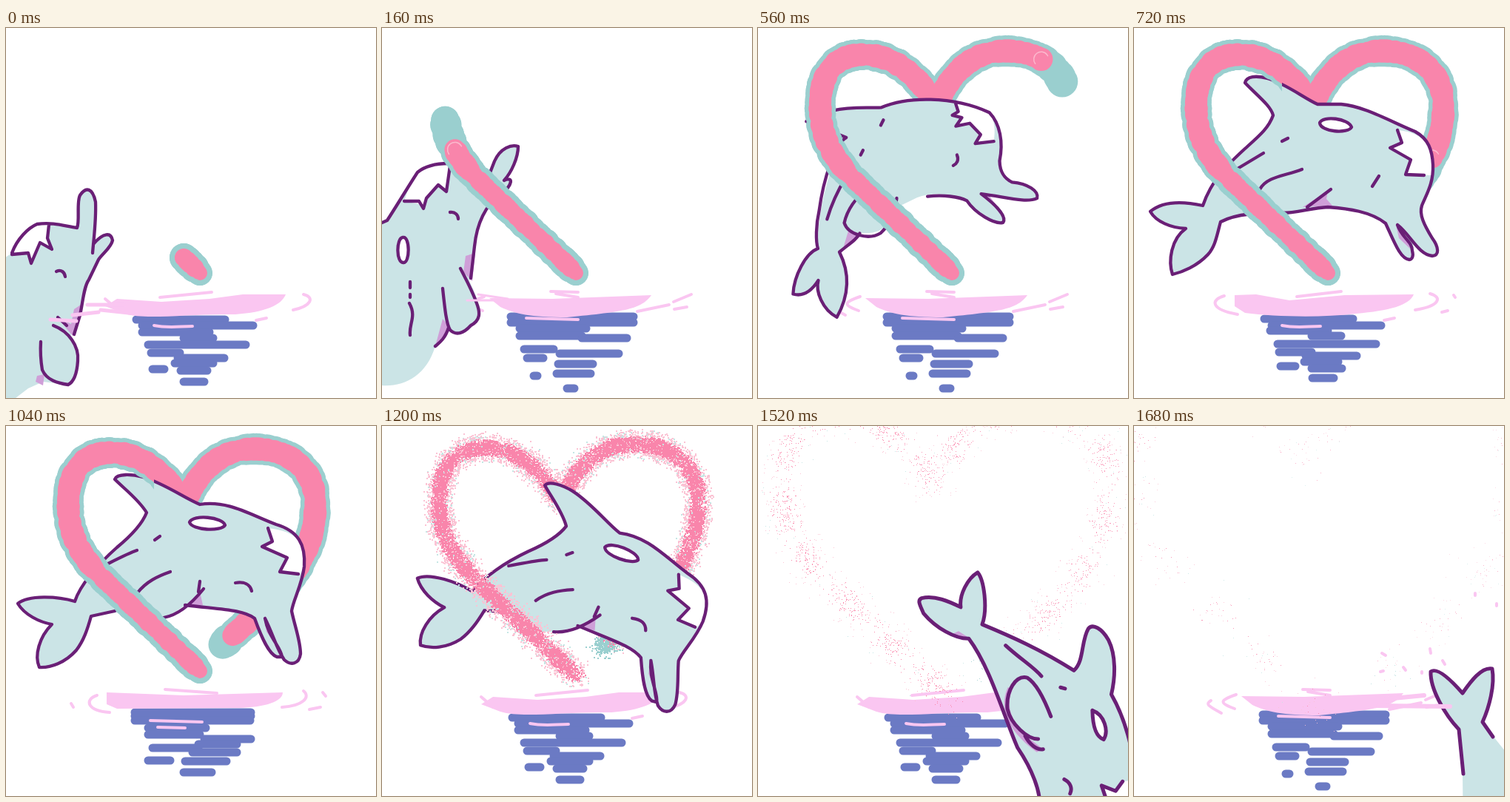
Animation of 500 by 500 pixels, one loop 1760 ms. Source, as an HTML page with a canvas:

```html
<!DOCTYPE html>
<html>
<head>
<meta charset="utf-8">
<style>
html, body { margin: 0; width: 100%; height: 100%; overflow: hidden; background: #fff; }
canvas { display: block; }
svg { position: absolute; width: 0; height: 0; }
</style>
</head>
<body>
<canvas id="stage" width="500" height="500"></canvas>
<svg><path id="heart" d="M262 331L130 205C95 170 84 140 84 105C84 60 105 37 140 36C185 35 217 66 241 105C260 60 290 31 335 31C385 31 418 60 418 105C418 160 395 195 360 235L292 296"/></svg>
<script>
const ctx = document.getElementById('stage').getContext('2d');
const heart = document.getElementById('heart');
const STEP = 80, STEPS = 22;
const BODY = '#cbe4e6', INK = '#6a1f76', PATCH = '#cf9fd8', PINK = '#f985ab',
  PALE = '#fbc3d4', TEAL = '#9acfcf', FOAM = '#fac6f1', SEA = '#6b7ac4';

const total = heart.getTotalLength();
const trail = [];
for (let l = 0; l <= total; l += 2) trail.push(heart.getPointAtLength(l));

// Each pose: step, anchor x/y, heading, then its shapes.
const poses = [
  { s: 0, x: 30, y: 420, a: -115,
    fill: 'M8 304C15 285 30 270 42 265C65 262 80 268 96 270C100 262 95 235 100 226C108 214 117 216 121 235L120 290C132 278 142 276 144 287C142 297 130 305 125 313L112 340C105 350 104 370 100 388L88 415C99 440 97 470 84 482L50 478L30 487L0 510L-80 640L-160 500L-60 350Z',
    white: 'M8 304C15 285 30 270 42 266L58 266L56 284L62 299L46 290L34 318L30 304Z',
    patch: 'M101 374L92 380L88 400L70 392L90 416L99 396ZM42 470L52 468L50 483L40 478Z',
    line: 'M8 304C15 285 30 270 42 265C65 262 80 268 96 270C100 262 95 235 100 226C108 214 117 216 121 235C122 260 119 280 117 304M118 292C132 276 142 276 144 287C142 297 130 305 125 313L112 340C105 350 104 370 100 388L92 414M58 266L56 284L62 299L46 290L34 318L30 304L8 306M68 329C75 326 79 330 80 336M64 402C85 410 99 430 97 450C96 465 92 478 84 482C70 480 55 476 49 462C47 450 46 440 47 424M70 391L82 402' },
  { s: 2, x: 45, y: 320, a: -90,
    fill: 'M5 262C20 240 35 215 48 195C60 185 78 183 90 183C110 190 130 200 145 198L150 180C160 162 175 157 184 160C184 175 175 195 168 204C178 202 176 212 160 226C140 238 128 265 125 295L118 342C135 375 133 390 120 402C110 413 100 416 92 408L72 430C60 470 30 485 0 483L-80 480L-60 290Z',
    white: 'M30 234C36 215 42 203 50 194C60 185 78 183 92 184L87 220L76 212L60 230L56 245L50 238ZM28 283C38 280 38 318 29 317C19 318 19 284 28 283Z',
    patch: 'M113 308L126 304L122 342L110 330ZM82 393L92 405L72 430Z',
    line: 'M0 263L7 260C20 240 35 215 48 195C60 185 78 183 90 183M145 198L152 180C160 162 175 157 184 160C184 175 175 195 165 206C178 200 177 212 160 226C140 238 128 265 125 295L120 338M30 234L50 234L56 244L60 230L76 212L87 221L92 186M92 249C99 248 103 253 103 258M28 283C38 280 38 318 29 317C19 318 19 284 28 283M38 343v8M38 360v4M37 372C47 390 36 400 38 415M82 352C85 380 87 400 92 408C100 416 110 413 120 402C133 395 133 385 128 372C122 355 118 348 106 325M90 405C85 420 78 425 72 430' },
  { s: 5, x: 106, y: 200, a: -68,
    fill: 'M-20 180L5 172C25 155 45 148 62 138C85 110 140 80 195 78C215 85 230 105 237 130C245 145 255 148 265 148C285 140 303 142 305 152C295 165 265 170 235 181C258 185 280 192 279 202C270 210 240 208 222 198C200 198 172 210 160 225L141 250C145 270 142 292 113 302L100 338C130 360 138 390 137 418C115 418 95 400 92 385C90 408 80 415 70 417C60 395 60 360 72 347C55 320 32 240 38 196L-20 200Z',
    white: 'M148 87C165 80 180 78 195 78C206 84 213 95 218 110L197 124L198 110L178 103L163 115L165 101L152 104L157 96Z',
    patch: 'M232 180L245 178L264 187ZM98 308L114 304L102 330Z',
    line: 'M-20 185L5 172C25 155 45 148 62 138C85 110 140 80 195 78C215 85 230 105 237 130C245 145 255 148 265 148C285 140 303 142 305 152C295 165 265 170 235 181C258 185 280 192 279 202C270 210 240 208 222 198C210 198 190 205 172 217M-20 201L38 196C28 210 36 260 50 300C55 320 65 340 72 347C60 360 60 395 70 417C80 415 90 408 92 385C95 400 115 418 137 418C138 390 130 360 100 338C108 320 113 312 113 303M148 87L157 96L152 104L165 101L163 115L178 103L198 110L197 124L218 110M182 149C188 154 187 160 184 164M62 244C60 270 62 290 65 306M66 201v7M72 152v8M96 240C85 265 84 285 88 300C100 312 128 306 138 290C145 270 142 255 136 238' },
  { s: 9, x: 250, y: 165, a: -14,
    fill: 'M150 74C152 65 165 64 180 68C205 75 230 95 248 103L280 103C310 105 350 128 380 140C398 150 403 165 404 185C405 210 395 225 389 240C385 252 392 266 403 284C412 296 413 308 403 308C392 306 385 296 376 285C380 305 377 313 372 313C360 312 352 290 340 264C320 248 290 244 262 242C240 243 220 250 200 250C170 250 140 250 117 262C112 280 110 295 100 306C85 322 65 330 52 333C46 315 50 285 70 271C50 270 30 262 22 248C40 233 70 235 93 240C105 205 125 186 150 163C170 145 182 135 188 118C185 105 165 90 150 74Z',
    white: 'M356 138C380 140 403 150 404 185L402 199L367 198L374 178L346 162L361 156ZM251 128C255 118 290 122 294 134C290 143 252 141 251 128Z',
    patch: 'M228 242L262 220L260 231L268 240ZM354 266L370 290L374 299L358 284Z',
    line: 'M356 266C362 284 376 288 376 301C378 308 376 313 372 313C360 312 352 290 340 264C320 248 290 244 262 242C240 243 220 250 200 250C170 250 140 250 117 262C112 280 110 295 100 306C85 322 65 330 52 333C46 315 50 285 70 271C50 270 30 262 22 248C40 233 70 235 93 240C105 205 125 186 150 163C170 145 182 135 188 118C185 105 165 90 150 74C152 65 165 64 180 68C205 75 230 95 248 103L280 103C310 105 350 128 380 140C398 150 403 165 404 185C405 210 395 225 389 240C385 252 392 266 403 284C412 296 413 308 403 308C384 306 374 280 356 266M251 128C255 118 290 122 294 134C290 143 252 141 251 128M140 190L175 169M170 218C180 200 205 200 227 191M200 153L208 149M322 214L331 200M266 218L234 242M356 138L362 155L346 162L374 178L367 198L392 199' },
  { s: 13, x: 248, y: 165, a: -12,
    fill: 'M147 72C150 64 170 65 185 69C215 78 240 97 262 106C300 100 330 120 365 133C395 142 405 160 403 190C400 215 388 235 386 250C390 270 398 290 398 308C396 322 385 324 373 312L366 312C355 308 345 285 336 260C320 248 290 248 242 242C225 255 210 262 195 262C170 250 140 250 115 257C110 275 105 290 95 303C80 320 60 327 45 326C38 310 45 285 62 268C45 265 25 255 16 240C30 228 70 230 93 237C100 215 125 186 150 164C173 145 185 130 190 117C180 100 160 85 147 72Z',
    white: 'M354 138C395 142 405 160 403 190L396 202L370 197L380 178L346 163L360 156ZM248 130C253 119 293 123 296 134C291 143 251 141 248 130Z',
    patch: 'M243 242L262 224L266 242ZM349 260L360 285L366 296L352 278Z',
    line: 'M350 260C354 284 372 300 373 312L366 312C355 308 345 285 336 260C320 248 290 248 242 242M267 220C255 235 235 255 213 259M147 250L115 257C110 275 105 290 95 303C80 320 60 327 45 326C38 310 45 285 62 268C45 265 25 255 16 240C30 228 70 230 93 237C100 215 125 186 150 164C173 145 185 130 190 117C180 100 160 85 147 72C150 64 170 65 185 69C215 78 240 97 262 106C300 100 330 120 365 133C395 142 405 160 403 190C400 215 388 235 386 250C390 270 398 290 398 308C396 322 385 324 376 316C365 300 362 284 350 260M248 130C253 119 293 123 296 134C291 143 251 141 248 130M130 190C150 180 165 172 177 168M178 225C190 210 205 203 222 197M201 154L208 149M260 224L262 210M310 212C322 210 330 214 332 223M354 138L360 156L346 163L380 178L370 197L395 200' },
  { s: 17, x: 335, y: 230, a: 20,
    fill: 'M190 182C230 175 275 168 328 168C333 150 315 130 314 110C315 100 330 100 345 108C365 120 380 145 388 168C420 185 455 215 475 248C490 270 497 290 494 300C490 325 465 350 441 372C438 390 446 410 441 428C435 435 425 432 418 418L410 402C410 415 402 420 397 412C392 400 395 375 390 352C380 330 350 310 320 297C280 270 230 225 185 208C170 218 140 220 115 212C105 205 98 202 102 196C115 183 135 180 153 178C142 165 140 140 147 126C160 130 185 160 190 182Z',
    white: 'M464 259L475 250C490 270 497 290 494 300C490 312 484 320 475 327L450 318L468 299L443 279L463 275ZM378 200C395 196 412 212 412 225C400 228 388 215 378 200Z',
    patch: 'M265 235C268 260 290 285 345 288L350 280L318 277C290 270 275 255 272 235ZM162 216L168 207L188 207Z',
    line: 'M190 182C230 175 275 168 328 168C333 150 315 130 314 110C315 100 330 100 345 108C365 120 380 145 388 168C420 185 455 215 475 248C490 270 497 290 494 300C490 325 465 350 441 372C438 390 446 410 441 428C435 435 425 432 418 418C410 400 405 385 404 372L410 400C410 415 402 420 397 412C392 400 395 375 390 352C380 330 350 310 320 297C280 270 230 225 185 208C170 218 140 220 115 212C105 205 98 202 102 196C115 183 135 180 153 178C142 165 140 140 147 126C160 130 185 160 190 182ZM335 237C315 222 295 210 280 210C265 215 265 240 280 260C295 275 325 280 337 272M320 278C330 284 344 286 350 280M232 189C260 194 280 193 295 198M325 197L331 195M378 200C395 196 412 212 412 225C400 228 388 215 378 200M396 299C405 298 412 303 413 311M464 259L463 275L443 279L468 299L450 318L475 327' },
  { s: 21, x: 464, y: 543, a: 85,
    fill: 'M444 470L439 410C420 390 400 355 401 332C410 325 430 345 444 361C455 345 470 325 484 328C488 350 480 380 471 400L486 420L510 450L520 640L446 640Z',
    white: '', patch: '',
    line: 'M445 470L439 410C420 390 400 355 401 332C410 325 430 345 444 361C455 345 470 325 484 328C488 350 480 380 471 400L485 420' }
];

// Bars are [x1, x2, y]; foam is a filled band plus thin strokes.
const waters = {
  A: { bars: [[176, 296, 394], [184, 334, 402], [184, 275, 411], [240, 280, 419], [192, 324, 428], [196, 235, 439], [232, 295, 446], [228, 280, 453], [198, 214, 461], [236, 272, 463], [240, 268, 478]],
    band: 'M150 366L210 370L275 366L320 360L378 360C372 375 350 384 310 387C240 386 190 395 160 386L134 376Z',
    foam: 'M208 364L278 357M200 402C220 406 235 403 252 403M402 360C418 364 412 376 388 381M338 395L352 392M134 366L150 380' },
  B: { bars: [[174, 340, 390], [174, 340, 398], [186, 276, 406], [186, 270, 416], [270, 331, 419], [192, 232, 434], [240, 320, 440], [196, 218, 446], [238, 285, 454], [236, 282, 467], [205, 210, 470], [250, 260, 487]],
    band: 'M145 365L230 366L364 361C350 380 330 383 250 391C200 391 180 386 160 377Z',
    foam: 'M228 356L265 357M235 359L265 364M195 392L265 394M138 363C115 371 115 374 136 382M104 371C96 376 100 378 118 388M345 383L388 374M394 370L418 360M395 380L412 377' },
  C: { bars: [[174, 331, 387], [174, 331, 392], [174, 330, 398], [192, 270, 408], [192, 262, 417], [268, 331, 423], [260, 312, 430], [198, 260, 435], [252, 312, 441], [192, 222, 452], [242, 298, 453], [240, 278, 468]],
    band: 'M136 360L240 364L374 360C374 375 340 381 310 381L150 382L136 376Z',
    foam: 'M215 356L285 361M195 398L265 400M205 407L242 408M402 358C412 366 402 378 373 380M428 360L432 365M410 383L425 380M123 364C105 370 110 385 140 387M88 375L91 380' },
  D: { bars: [[176, 296, 393], [186, 334, 402], [184, 262, 409], [240, 280, 416], [194, 327, 427], [196, 240, 438], [232, 301, 443], [230, 276, 451], [198, 218, 457], [240, 281, 460], [241, 270, 473]],
    band: 'M136 361L165 360L210 368L285 361L378 360C372 375 345 382 300 386C250 392 190 390 150 385L136 376Z',
    foam: 'M220 363L280 356M200 402C220 406 235 403 252 403M400 359C418 364 412 376 380 381M338 395L352 392M432 361L434 364M416 384L424 382M122 362C104 367 102 380 140 387' }
};
const waterOrder = 'ACBBAACBDDCBCCBACCCABB';

const fill = (d, color) => { ctx.fillStyle = color; ctx.fill(new Path2D(d)); };
function line(d, color, width) {
  ctx.strokeStyle = color;
  ctx.lineWidth = width;
  ctx.stroke(new Path2D(d));
}
function seeded(seed) {
  return () => (seed = (seed * 16807) % 2147483647) / 2147483647;
}
const lerp = (a, b, f) => a + (b - a) * f;

function drawWater(w) {
  for (const [x1, x2, y] of w.bars) line(`M${x1} ${y}H${x2}`, SEA, 11);
  fill(w.band, FOAM);
  line(w.foam, FOAM, 4);
}

function drawDolphin(step) {
  const i = Math.max(0, poses.findLastIndex(p => p.s <= step));
  const from = poses[i], to = poses[i + 1] || from;
  const f = to === from ? 0 : (step - from.s) / (to.s - from.s);
  const pose = f < 0.55 ? from : to;
  ctx.save();
  ctx.translate(lerp(from.x, to.x, f), lerp(from.y, to.y, f));
  ctx.rotate((lerp(from.a, to.a, f) - pose.a) * Math.PI / 180);
  ctx.translate(-pose.x, -pose.y);
  fill(pose.fill, BODY);
  fill(pose.patch, PATCH);
  fill(pose.white, '#fff');
  line(pose.line, INK, pose.s > 13 ? 5 : 4.3);
  ctx.restore();
}

// Overlapping discs with jittered radii give the crayon edge.
function stamp(length, color, radius) {
  const rnd = seeded(77);
  ctx.fillStyle = color;
  ctx.beginPath();
  for (let i = 0; i < trail.length && i * 2 <= length; i++) {
    const { x, y } = trail[i], r = radius(i * 2) + rnd() * 3 - 1.5;
    ctx.moveTo(x + r, y);
    ctx.arc(x, y, r, 0, 7);
  }
  ctx.fill();
}

const growth = [[0, 30], [2, 235], [5, 555], [9, 850], [12, total - 18]];
function drawTrail(step) {
  let length = total - 18;
  for (let i = 0; i < 4; i++) {
    const [s1, l1] = growth[i], [s2, l2] = growth[i + 1];
    if (step >= s1 && step < s2) length = lerp(l1, l2, (step - s1) / (s2 - s1));
  }
  stamp(length + (step ? 42 : 0), TEAL, l => l < 200 ? 18.5 : 20);
  stamp(length, PINK, l => l < 200 ? 11.5 : 14.5);
  if (step && step < 10) {
    const tip = trail[Math.floor(length / 2)];
    ctx.strokeStyle = '#fbb9cd';
    ctx.lineWidth = 1.5;
    ctx.beginPath();
    ctx.arc(tip.x, tip.y, 10, 2.5, 5.8);
    ctx.stroke();
  }
}

// The heart breaks into clumps of specks that drift outwards and thin out.
function drawDust(k) {
  const rnd = seeded(1234 + k);
  const bell = () => rnd() + rnd() + rnd() - 1.5;
  const scale = 1 + 0.0145 * k ** 1.73;
  const count = Math.min(30000, 17000 * Math.exp(-0.6 * (k - 4)));
  const spread = 9 + k * 2.4, size = k < 6 ? 2 : 1;
  const floor = Math.max(0, 0.5 - k * 0.07);
  ctx.globalAlpha = Math.min(1, 1.6 - k / 8);
  for (let i = 0; i < count; i++) {
    const l = rnd() * total, dx = bell(), dy = bell();
    const clump = 0.5 + 0.5 * Math.cos((l - 31) * Math.PI / 30);
    if (rnd() > lerp(floor, 1, clump ** (k / 4))) continue;
    const p = trail[Math.floor(l / 2)];
    const end = l > total - 18, far = Math.hypot(dx, dy);
    const edge = rnd() < 0.15 ? '#c5e6e4' : PALE;
    ctx.fillStyle = end ? TEAL : far > 0.85 || k > 6 && i % 2 ? edge : PINK;
    const reach = far > 0.85 ? spread * 1.15 : spread;
    ctx.fillRect(Math.round(245 + (p.x - 245) * scale + dx * reach),
      Math.round(190 + (p.y - 190) * scale + dy * reach), size, size);
  }
  ctx.globalAlpha = 1;
}

function draw(step) {
  ctx.fillStyle = '#fff';
  ctx.fillRect(0, 0, 500, 500);
  ctx.lineCap = ctx.lineJoin = 'round';
  drawWater(waters[waterOrder[step]]);
  const drawHeart = () => step > 13 ? drawDust(step - 13) : drawTrail(step);
  drawHeart();
  drawDolphin(step);
  // The left strand passes in front of the dolphin.
  ctx.save();
  ctx.clip(new Path2D('M0 0H200V230L262 290L300 380V500H0Z'));
  drawHeart();
  ctx.restore();
  if (step === 0) line('M60 394L95 396M90 388L125 384M110 374L160 374M128 381L175 386', FOAM, 5);
  if (step === 2) line('M115 368L150 368M130 360L170 366', FOAM, 3);
  if (step === 17) {
    line('M372 352L375 362M460 364L465 359', FOAM, 3);
    line('M355 392H382', SEA, 3);
  }
  if (step > 19) {
    line('M330 378L427 379M340 369L392 364', FOAM, 6);
    line('M461 226v3M490 240v3M335 307L340 310M333 332L337 331M364 326L367 330M400 301L401 307M417 317L420 322M389 332v2', FOAM, 4);
  }
}

let shown = -1;
function tick() {
  const step = Math.floor(performance.now() / STEP) % STEPS;
  if (step !== shown) draw(shown = step);
  requestAnimationFrame(tick);
}
tick();
</script>
</body>
</html>
```
